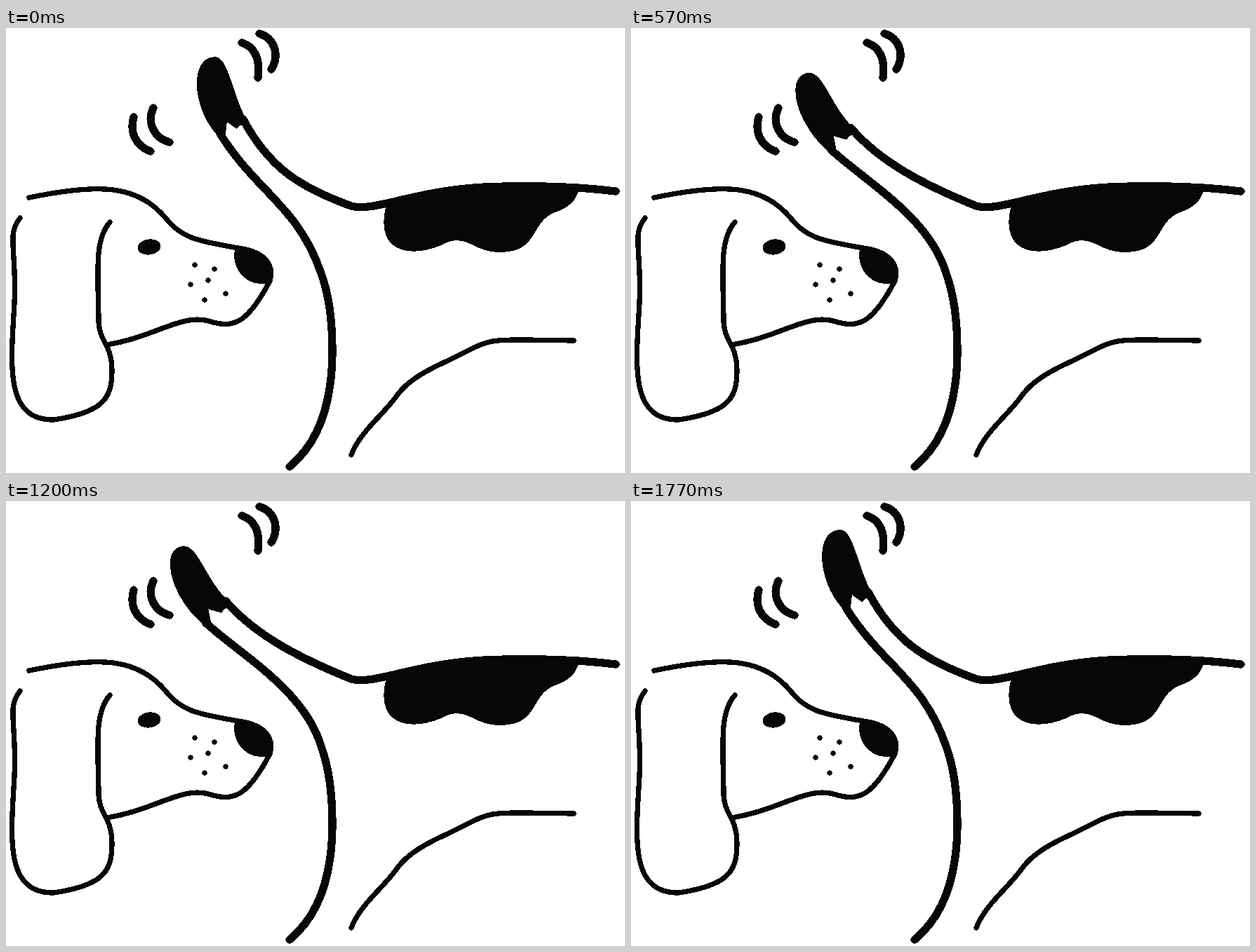
Write an HTML page without scripts that moves like this. It is 882 px wide and 635 px high and loops after 1.8 s.

```html
<!DOCTYPE html>
<html lang="en">
<head>
<meta charset="utf-8">
<title>Wagging tail</title>
<style>
html, body { margin: 0; width: 100%; height: 100%; overflow: hidden; background: #fff; }
svg { display: block; width: 882px; height: 635px; shape-rendering: crispEdges; }
.line { fill: none; stroke: #070707; stroke-width: 7.3; stroke-linecap: round; stroke-linejoin: round; }
.bold { stroke-width: 11.3; }
.ink { fill: #070707; }

/* Each tail part swings between an upright and a lowered pose. */
.under {
  --up: path("M306 152C359 236 416 254 449 350");
  --low: path("M279 180C325 213 428 274 449 350");
}
.over {
  --up: path("M338 130C375 200 420 228 492 254");
  --low: path("M306 146C350 190 420 224 492 254");
}
.tip {
  --up: path("M298 41C262 41 264 112 301 153L313 152L315 134L329 144L334 139L347 139C322 96 318 41 298 41Z");
  --low: path("M241.5 70.5C207 72 222 139 274 182L286 177L281 160L301 164L304 159L316 151C275 122 264 72 241.5 70.5Z");
}
.under, .over, .tip { animation: wag 1.8s linear infinite; }

/* Five even swings of 354 ms, then a 30 ms rest. */
@keyframes wag {
  0%, 19.6667%, 39.3333%, 59%, 78.6667%, 98.3333%, 100% { d: var(--up); }
  9.8333%, 29.5%, 49.1667%, 68.8333%, 88.5% { d: var(--low); }
}
</style>
</head>
<body>
<svg viewBox="0 0 882 635" role="img" aria-label="A dog sniffing behind another dog whose tail wags">
  <!-- sniffing dog: profile, ear, nose, eye, whisker dots -->
  <path class="line" d="M33 242C130 222 188 222 229 273C250 299 272 304 331 314C366 319 383 335 376 361C345 420 325 428 295 420C252 404 215 441 143 452"/>
  <path class="line" d="M20 271C-1 298 18 318 11 410C6 490 2 560 68 559C134 549 151 532 151 490S132 450 132 415C131 345 126 302 148 277"/>
  <path class="ink" d="M326 316C366 313 383 335 376 364C340 372 320 340 326 316Z"/>
  <ellipse class="ink" cx="204" cy="312.5" rx="16.5" ry="11" transform="rotate(-8 204 312.5)"/>
  <path class="line" d="M269 338h.01M297 344h.01M288 360h.01M263 366h.01M313 379h.01M283 388h.01"/>

  <!-- wagging dog: belly, patch, back, rump, tail -->
  <path class="line" d="M492 609C505 575 540 550 558 523C582 492 622 480 655 462S700 445 740 445L809 446"/>
  <path class="ink" d="M542 252C524 320 575 329 620 310C656 290 664 320 703 320C762 320 745 275 785 262C805 255 815 243 816 228C740 224 640 224 542 252Z"/>
  <g class="line bold">
    <path d="M492 254C528 264 590 226 715 226C770 225 820 227 869 233"/>
    <path d="M449 350C461 383 465 420 465 460S460 580 404 626"/>
    <path class="under"/>
    <path class="over"/>
  </g>
  <path class="tip ink"/>

  <!-- motion marks -->
  <path class="line bold" d="M361 8C384 15 390 40 378 59M336 21C357 28 362 48 359 71M182 127C176 148 184 168 206 176M210 114C200 135 211 157 233 163"/>
</svg>
</body>
</html>
```
